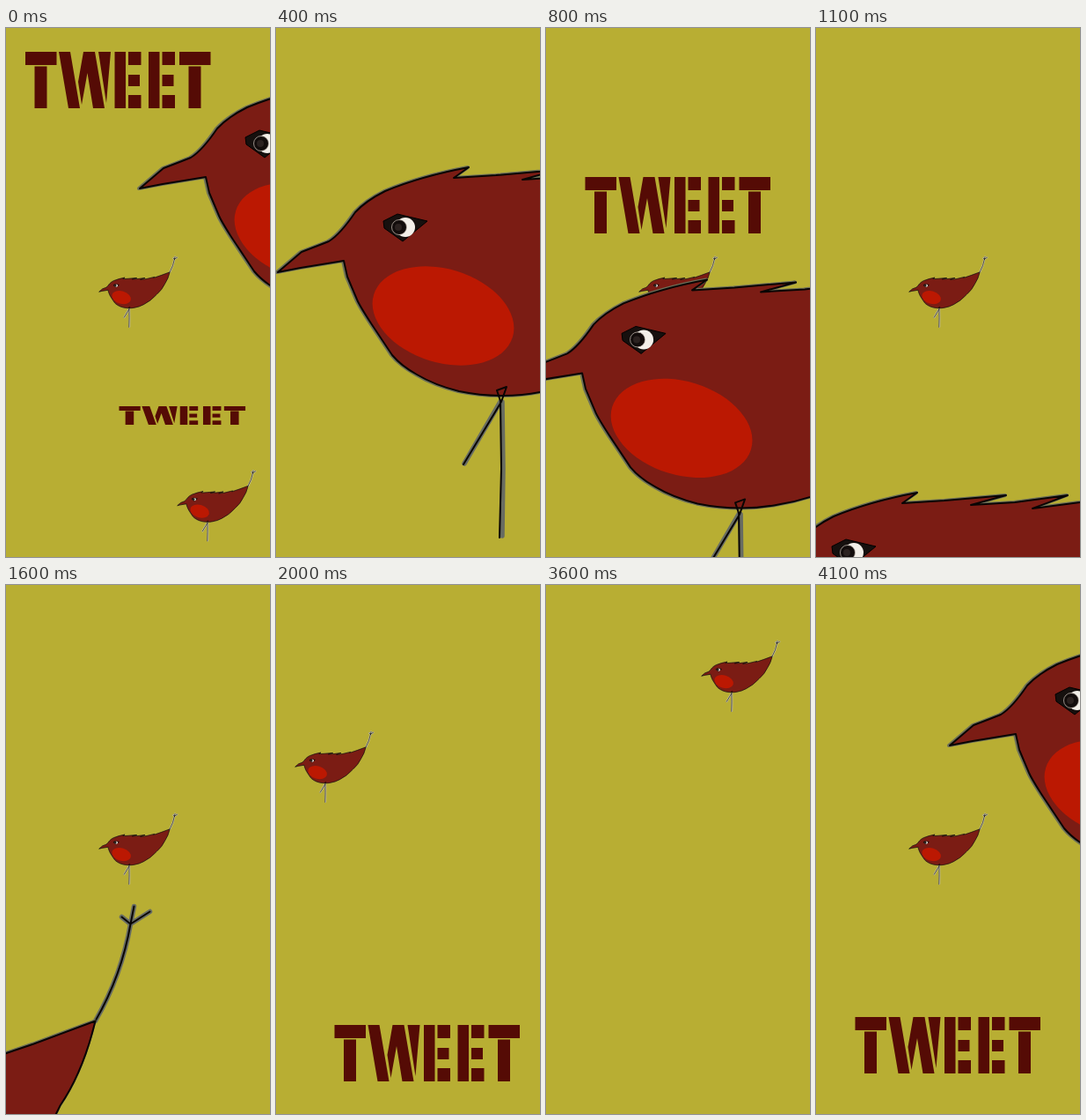
These frames come from a looping animation (300x600 px, 4.6 s). An HTML page:

```html
<!DOCTYPE html>
<html lang="en">
<head>
<meta charset="utf-8">
<title>Tweet</title>
<style>
  html, body { margin: 0; width: 100%; height: 100%; overflow: hidden; background: #b8ae33; }
  svg { display: block; width: 300px; height: 600px; }
  .ink { fill: none; stroke: #090504; stroke-width: var(--ink); stroke-linejoin: round; stroke-linecap: round; }
  .shade { fill: none; stroke: #6c6f58; stroke-width: 4px; stroke-linejoin: round; }
  .leg { fill: none; stroke: var(--leg); stroke-width: var(--leg-width); stroke-linecap: round; }
  .big { --ink: 2px; --leg: #686c62; --leg-width: 5.5px; }
  .small { --ink: 4.5px; --leg: #c5c2a6; --leg-width: 15px; }
</style>
</head>
<body>
<svg viewBox="0 0 300 600" role="img" aria-label="TWEET">
  <defs>
    <path id="body" d="M2 277L29 254Q50 246 60 242Q73 234 90 209Q102 196 124 185Q165 168 219 158L202 170 250 167 320 161 280 172 330 169 390 161 350 176 404 169 470 153 462 161 530 138 600 112Q586 170 560 208 535 262 488 302 440 356 377 387 340 407 300 413 280 417 258 417 232 417 208 412 180 405 160 393 142 383 132 371L108 335Q95 315 92 308L81 282 77 264 28 272Z"/>
    <path id="tail" d="M600 112Q630 60 640 2M640 2L630 -6M640 2L644 -18M640 2L662 -12"/>

    <!-- The beak tip is the origin. -->
    <g id="bird">
      <g transform="translate(-2 -277)">
        <use href="#tail" class="leg"/>
        <use href="#tail" class="ink"/>
        <use href="#body" class="shade" x="-1"/>
        <use href="#body" fill="#7b1c14"/>
        <ellipse cx="190" cy="326.5" rx="82.5" ry="53" transform="rotate(17 190 326.5)" fill="#bb1802"/>
        <use href="#body" class="ink"/>
        <path d="M257 424L258 500 257 576M255 424L214 494" class="leg"/>
        <path d="M254 578L256 500 255 423 251 411 262 407 256 424 213 495" class="ink"/>
        <path d="M122 219L138 211 172 219 144 242 123 227Z" fill="#16100e" stroke="#000"/>
        <ellipse cx="147" cy="226" rx="11" ry="11" fill="#f3efe9"/>
        <circle cx="140" cy="226" r="8.5" fill="#120c0b" stroke="#cfc3b9" stroke-width=".7"/>
        <circle cx="139" cy="226" r="4" fill="#2b2220"/>
      </g>
    </g>

    <path id="stencilE" d="M0 0H12.500V64H0ZM15.500 0H30V15H15.500ZM15.500 26H28.500V39H15.500ZM15.500 49H30V64H15.500Z"/>
    <path id="stencilT" d="M0 0H35.500V15H0ZM10.500 16.500H24.500V64H10.500Z"/>
    <g id="word" fill="#550b05">
      <use href="#stencilT"/>
      <path d="M38 0H51L62 64H49ZM60 34L66 0H79L90 64H77L70.500 24 64 60ZM83 0H97L92 58Z"/>
      <use href="#stencilE" x="101.500"/>
      <use href="#stencilE" x="140"/>
      <use href="#stencilT" x="175"/>
    </g>
  </defs>

  <rect width="300" height="600" fill="#b8ae33"/>
  <use id="centre" href="#bird" class="small"/>
  <use id="small" href="#bird" class="small"/>
  <use id="giant" href="#bird" class="big"/>
  <use id="wide" href="#word"/>
  <use id="tall" href="#word"/>
</svg>
<script>
  const LOOP = 4600;
  const LAST = 20;
  const BIRD_SCALE = "scale(.134)";
  const WORD_SCALE = "scale(.682 .33)";
  const WORD_X = 44.5;

  // The beat is 200 ms, doubles in speed for the big bird's dive, then slows to 500 ms.
  function stepAt(time) {
    if (time < 400) return Math.floor(time / 200);
    if (time < 1200) return Math.floor(time / 100) - 2;
    if (time < 2600) return Math.floor(time / 200) + 4;
    return Math.floor((time - 2600) / 500) + 17;
  }

  const mix = (from, to, amount) => from.map((value, i) => value + (to[i] - value) * amount);

  // Enters from the right, dives with growing speed, then slides out to the left.
  function giantAt(step) {
    const enter = [152, 182], perch = [2, 277], low = [-102, 646], exit = [-628, 664];
    if (step === LAST) return enter;
    if (step < 2) return mix(enter, perch, step / 2);
    if (step < 9) return mix(perch, low, ((step - 2) / 7) ** 1.9);
    if (step < 14) return mix(low, exit, (step - 9) / 4);
  }

  const smallStops = { 0: [195, 541.5], 14: [22, 206], 15: [194, 188], 16: [90, 401], 17: [186, 464], 19: [177, 103] };
  const wideStops = { 0: [128.5, 429], 15: [78, 420], 17: [78.5, 279] };
  const tallStops = { 0: [22, 27], 14: [66.5, 499], 16: [23, 25], 18: [WORD_X, 236], 20: [WORD_X, 490] };

  function tallAt(step) {
    const falling = step >= 4 && step <= 6;
    return falling ? [WORD_X, 46 + (step - 4) * 61.5] : tallStops[step];
  }

  function place(id, point, scale = "") {
    const part = document.getElementById(id);
    part.style.display = point ? "" : "none";
    if (point) part.setAttribute("transform", `translate(${point}) ${scale}`);
  }

  function draw() {
    const step = stepAt(performance.now() % LOOP);
    place("centre", step < 13 || step === LAST ? [106, 299] : null, BIRD_SCALE);
    place("small", smallStops[step], BIRD_SCALE);
    place("giant", giantAt(step));
    place("wide", wideStops[step], WORD_SCALE);
    place("tall", tallAt(step));
    requestAnimationFrame(draw);
  }
  draw();
</script>
</body>
</html>
```
